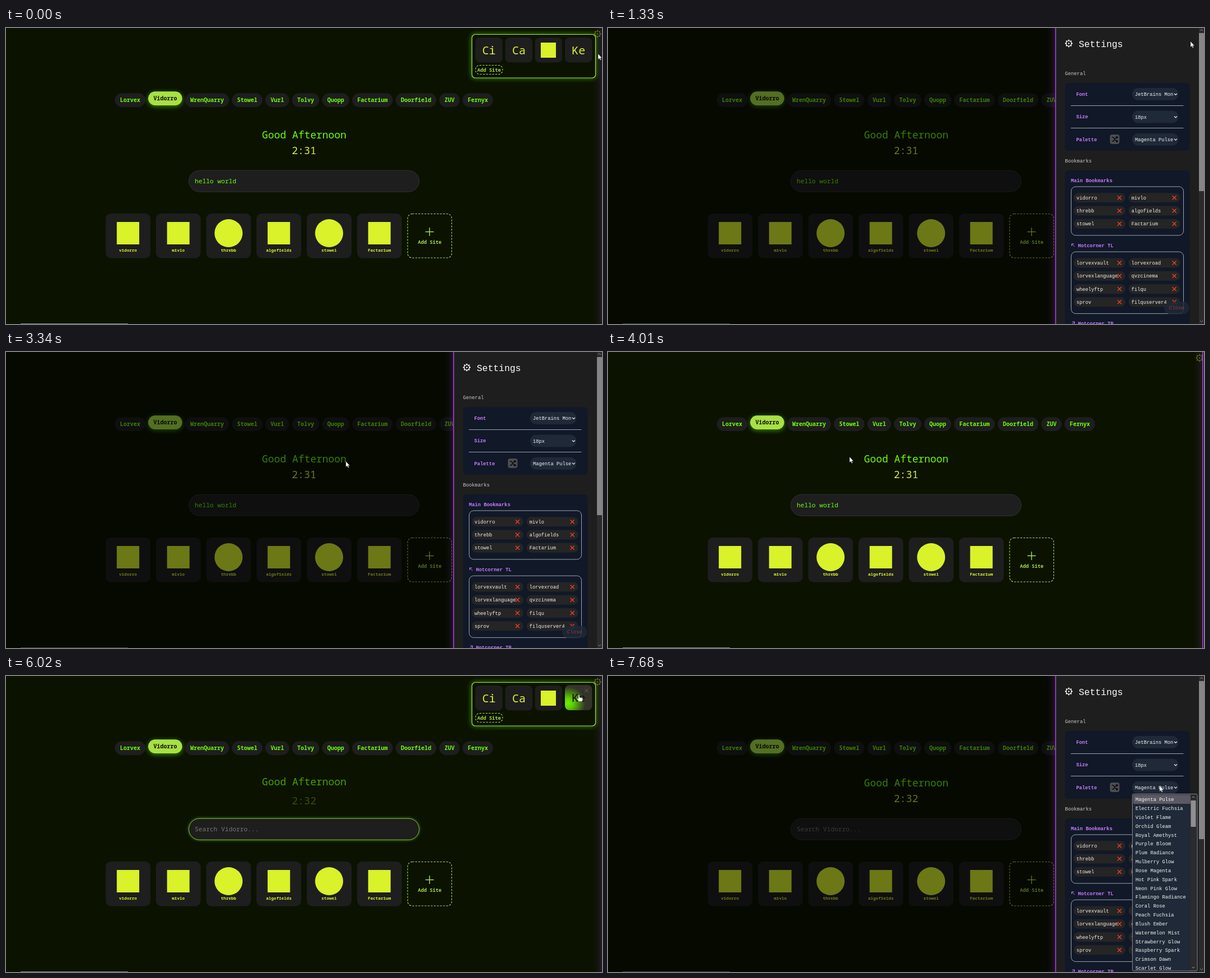
An HTML page that plays this animation: 1061 px wide and 528 px high, repeating every 8 s.

```html
<!DOCTYPE html>
<html lang="en">
<head>
<meta charset="utf-8">
<title>Start page</title>
<style>
  html, body { margin: 0; width: 100%; height: 100%; overflow: hidden; background: #0b1200; }
  svg { display: block; width: 1061px; height: 528px; font: 500 10px "Noto Sans Mono", "DejaVu Sans Mono", monospace; }
  #panel { font-family: "Liberation Mono", "Courier New", monospace; font-weight: 400; }
  .mid { text-anchor: middle; }
  .bold { font-weight: 700; }
  .active { filter: drop-shadow(0 2px 4px rgba(102, 255, 0, .5)); }
  .frame { filter: drop-shadow(0 0 5px rgba(102, 255, 0, .55)); }
  .focus { filter: drop-shadow(0 0 2.5px rgba(102, 255, 0, .5)); }
</style>
</head>
<body>
<svg id="stage" viewBox="0 0 1061 528"></svg>
<script>
const GREEN = '#70ff00', YELLOW = '#d9f22a', LIME = '#a8e045', CARD = '#1e1e1e',
      NAVY = '#111827', SLATE = '#1f2937', PURPLE = '#c77dff';
const DASHED = `stroke="${LIME}" stroke-width="1.1" stroke-dasharray="3.3 2.2"`;
const LOOP = 8000, CLOSED = 265;

const rect = (x, y, w, h, r, fill, more = '') =>
  `<rect x="${x}" y="${y}" width="${w}" height="${h}" rx="${r}" fill="${fill}" ${more}/>`;
const line = (d, color, width = 1, more = '') =>
  `<path d="${d}" fill="none" stroke="${color}" stroke-width="${width}" ${more}/>`;
// y is the middle of the capitals
const text = (x, y, size, fill, str, more = '') =>
  `<text x="${x}" y="${y + size * .36}" font-size="${size}" fill="${fill}" ${more}>${str}</text>`;
const group = (id, body, more = '') => `<g id="${id}" ${more}>${body}</g>`;
const gear = (x, y, color) => {
  let teeth = '';
  for (let i = 0; i < 8; i++) {
    const c = Math.cos(i * Math.PI / 4), s = Math.sin(i * Math.PI / 4);
    teeth += `M${x + 4.8 * c} ${y + 4.8 * s}L${x + 6.7 * c} ${y + 6.7 * s}`;
  }
  return line(teeth, color, 2) +
    `<circle cx="${x}" cy="${y}" r="4.6" fill="none" stroke="${color}" stroke-width="1.4"/>` +
    `<circle cx="${x}" cy="${y}" r="1.2" fill="${color}"/>`;
};

function engines() {
  const names = ['Lorvex', 'Vidorro', 'WrenQuarry', 'Stowel', 'Vurl', 'Tolvy', 'Quopp',
                 'Factarium', 'Doorfield', 'ZUV', 'Fernyx'];
  let x = 193.6, out = '';
  names.forEach((name, i) => {
    const on = i === 1, w = 6 * name.length + 18.6, y = on ? 113.3 : 116.3;
    out += rect(x, y, w, 24.6, 12.3, on ? LIME : CARD, on ? 'class="active"' : '') +
      text(x + 9.3, y + 12.4, 10, on ? '#0b1200' : GREEN, name, 'class="bold"');
    x += w + 4.9;
  });
  return out;
}

function bookmarks() {
  const names = ['vidorro', 'mivlo', 'threbb', 'algofields', 'stowel', 'Factarium'];
  const out = names.map((name, i) => {
    const x = 177.5 + 89.5 * i, c = x + 39.7;
    const icon = i === 2 || i === 4
      ? `<circle cx="${c}" cy="366" r="25" fill="${YELLOW}"/>`
      : rect(c - 20, 346, 40, 40, 0, YELLOW);
    return rect(x, 331, 79.5, 79.5, 9, CARD) + icon +
      text(c, 396, 7.6, YELLOW, name, 'class="mid bold"');
  });
  return out.join('') +
    rect(715, 331.5, 78.5, 78.5, 8, 'none', DASHED) +
    line('M746.5 363.5h15M754 356v15', LIME, 1.4) +
    text(754.3, 382, 8.75, LIME, 'Add Site', 'class="mid bold"');
}

function corner() {
  const tile = x => rect(x, 17, 48.5, 44.5, 8, CARD);
  const label = (x, str) => tile(x) + text(x + 24.3, 40, 20, YELLOW, str, 'class="mid"');
  return rect(829.5, 11.5, 220, 77.5, 6, '#0b1200', `stroke="${LIME}" stroke-width="1.2" class="frame"`) +
    label(835.5, 'Ci') + label(888.7, 'Ca') + tile(941.8) + rect(952, 26, 27, 27, 0, YELLOW) +
    group('rest', label(995, 'Ke')) +
    group('hover', rect(995, 16, 48.5, 45, 8, 'url(#spot)') +
      text(1019.3, 39, 20, '#0b1200', 'Ke', 'class="mid"') +
      line('M1030.5 23l6 6m0-6l-6 6', '#6a6a62')) +
    rect(836, 66.5, 48, 16, 7, 'none', DASHED) +
    text(860, 74.5, 8.75, LIME, 'Add Site', 'class="mid bold"');
}

function select(y, value) {
  return rect(933, y - 11, 82.5, 22, 11, SLATE) +
    `<g clip-path="url(#field)">${text(938, y, 8.75, '#f4f4f4', value)}</g>` +
    line(`M1008 ${y - 1}l2.5 2.5l2.5-2.5`, '#eee', 1.2);
}

function chips(top, names) {
  const height = Math.ceil(names.length / 2) * 23.3 + 17;
  return rect(824.5, top, 200, height, 8, 'none', 'stroke="#9ca3af"') + names.map((name, i) => {
    const x = 829 + (i % 2) * 97.7, y = top + 19.7 + (i >> 1) * 23.25;
    return rect(x, y - 8.5, 92, 17, 8.5, '#252525') + text(x + 5, y, 8.75, '#f0f0f0', name) +
      line(`M${x + 78} ${y - 3.5}l7 7m0-7l-7 7`, '#e8412c', 1.4);
  }).join('');
}

function menu() {
  const names = ['Magenta Pulse', 'Electric Fuchsia', 'Violet Flame', 'Orchid Gleam', 'Royal Amethyst',
    'Purple Bloom', 'Plum Radiance', 'Mulberry Glow', 'Rose Magenta', 'Hot Pink Spark', 'Neon Pink Glow',
    'Flamingo Radiance', 'Coral Rose', 'Peach Fuchsia', 'Blush Ember', 'Watermelon Mist',
    'Strawberry Glow', 'Raspberry Spark', 'Crimson Dawn', 'Scarlet Glow'];
  return rect(933.5, 210.5, 115.5, 315.5, 2, SLATE, 'stroke="#85858a"') +
    rect(935, 212, 102, 16, 0, '#5c5962') +
    names.map((name, i) => text(939, 220 + 15.84 * i, 8.8, '#f4f4f4', name)).join('') +
    rect(1037, 212, 10, 313, 0, '#2b2b2b') + rect(1037.5, 222, 9, 47, 0, '#8f8f8f') +
    line('M1040 217l2-2l2 2M1040 519l2 2l2-2', '#a0a0a0');
}

function panel() {
  const label = (x, y, str) => text(x, y, 8.8, PURPLE, str, 'class="bold"');
  const shuffle = 'M897 195h2.5l5 7h2.5M897 202h2.5l5-7h2.5M905 193l2.5 2l-2.5 2M905 200l2.5 2l-2.5 2';
  return rect(780, 0, 16, 528, 0, 'url(#halo)') + rect(796, 0, 265, 528, 0, CARD) +
    rect(796, 0, 1.6, 528, 0, '#a83fd6') +
    gear(820.3, 27.5, '#fff') + text(838, 28.5, 16.4, '#fff', 'Settings') +
    text(813.5, 80.5, 8.8, '#c8c8c8', 'General') + text(813.5, 236.5, 8.8, '#c8c8c8', 'Bookmarks') +
    rect(813.5, 98, 222, 121, 7, NAVY) + line('M824 138.5h200.5M824 178.5h200.5', '#9ca3af') +
    label(833.5, 118, 'Font') + label(833.5, 158, 'Size') + label(833.5, 198.5, 'Palette') +
    rect(893.5, 190, 17, 17, 4, '#4b4d52') + line(shuffle, '#0c0c0c', 1.4) +
    select(118, 'JetBrains Mono') + select(158.5, '18px') + select(198.7, 'Magenta Pulse') +
    rect(813.5, 254, 222, 290, 7, NAVY) +
    label(824, 271.5, 'Main Bookmarks') +
    chips(283, ['vidorro', 'mivlo', 'threbb', 'algofields', 'stowel', 'Factarium']) +
    line('M830.5 390l-5-5m0 4v-4h4', PURPLE) + label(836.5, 387.5, 'Hotcorner TL') +
    chips(399.2, ['lorvexvault', 'lorvexroad', 'lorvexlanguage', 'qvzcinema', 'wheelyftp', 'filqu',
      'sprov', 'filquserver4']) +
    line('M825.5 529l5-5m-4 0h4v4', PURPLE) + label(836.5, 526.5, 'Hotcorner TR') +
    rect(990, 488, 44.5, 22.5, 11, SLATE, 'opacity=".8"') +
    text(1012.3, 499, 9, '#85403c', 'Close', 'class="mid"') +
    rect(1052, 0, 9, 528, 0, '#2b2b2b') + rect(1052, 9, 9, 282, 0, '#858585') +
    line('M1054 5l2.5-2.5l2.5 2.5M1054 522l2.5 2.5l2.5-2.5', '#8f8f8f') +
    group('menu', menu());
}

stage.innerHTML = `<defs>
  <linearGradient id="halo"><stop stop-color="#8040c0" stop-opacity="0"/>
    <stop offset=".5" stop-color="#8040c0" stop-opacity=".06"/>
    <stop offset="1" stop-color="#8040c0" stop-opacity=".2"/></linearGradient>
  <radialGradient id="spot" cx=".1" cy=".72" r=".65"><stop stop-color="#6cf000"/>
    <stop offset=".3" stop-color="#5fd000"/><stop offset="1" stop-color="#34342a"/></radialGradient>
  <clipPath id="field"><rect x="933" y="100" width="73" height="120"/></clipPath></defs>` +
  rect(0, 0, 1061, 528, 0, '#0b1200') +
  group('page', engines() +
    text(530.9, 191, 17.9, GREEN, 'Good Afternoon', 'class="mid" id="greet"') +
    text(530.5, 218, 18.2, YELLOW, '', 'class="mid" id="clock"') +
    rect(325.5, 254.2, 410, 38, 19, CARD, 'id="search"') +
    text(336, 273.3, 11.2, GREEN, '', 'id="query"') +
    rect(336, 267, 1, 12, 0, GREEN, 'id="caret"') +
    bookmarks() + group('cog', gear(1053, 10.5, YELLOW)) + group('corner', corner())) +
  rect(26, 527, 191, 1, 0, '#87917f') +
  rect(0, 0, 1061, 528, 0, '#000', 'id="dim" opacity=".5"') +
  group('panel', panel()) +
  group('cursor',
    '<path id="arrow" d="M0 0v10l2.3-2l1.7 3.4l1.5-.7l-1.6-3.3h3z" fill="#fff" stroke="#222" stroke-width=".4"/>' +
    '<path id="hand" d="M-1-5q1.2-1 2 0v4l5 1.2q1 .4 .8 1.6l-1 4.7h-6l-3.5-5q.8-1.5 2.7.4z" fill="#fff" stroke="#222" stroke-width=".5"/>');

const $ = id => document.getElementById(id);
const show = (id, on) => $(id).setAttribute('visibility', on ? 'inherit' : 'hidden');
const within = (t, a, b) => t >= a && t < b;
const at = (track, t) => track.findLast(key => key[0] <= t);

const slide = [[0, CLOSED], [990, 40], [1330, 0], [3670, 200], [4010, 262], [4340, CLOSED], [7020, 20], [7360, 0]];
// time, x, y, hand
const pointer = [[0, 1054, 46], [330, 1054, 15], [660, 1053, 13, 1], [990, 1044, 20], [1330, 1037, 24],
  [1660, 976, 168], [2010, 969, 187], [2340, 974, 190], [2680, 969, 214], [3010, 969, 217], [3340, 605, 195],
  [3670, 520, 191], [4010, 430, 187], [4340, 414, 181], [4670, -50, 0], [5340, -50, 0], [5690, -50, 0],
  [6020, 1020, 39, 1], [6350, 1045, 14], [6680, 1052, 13, 1], [7020, 1010, 129], [7360, 985, 182],
  [7680, 982, 196]];

function settle(id, t, start, rate, rise) {
  const left = t < 5340 ? 0 : t < 6020 ? 1 : start * Math.exp((6020 - t) / rate);
  $(id).setAttribute('opacity', 1 - left);
  $(id).setAttribute('transform', `translate(0 ${rise * left})`);
}

function draw(now) {
  const [t, x, y, hand] = at(pointer, now % LOOP);
  const reloaded = t >= 5340, focus = within(t, 6020, 7020);

  show('page', t !== 5340);
  show('corner', t < 330 || within(t, 6020, 6680));
  show('hover', t === 6020);
  show('rest', t !== 6020);
  show('caret', t === 6350);
  show('dim', within(t, 990, 3670) || t >= 7020);
  show('menu', within(t, 2340, 3340) || t >= 7680);
  show('arrow', !hand);
  show('hand', hand);

  settle('greet', t, .4, 300, -7);
  settle('clock', t, .75, 600, 6);
  $('clock').textContent = reloaded ? '2:32' : '2:31';
  $('query').textContent = reloaded ? 'Search Vidorro...' : 'hello world';
  $('query').setAttribute('fill', reloaded ? '#757575' : GREEN);
  $('search').setAttribute('stroke', focus ? '#86b83a' : '#333');
  $('search').setAttribute('class', focus ? 'focus' : '');
  $('cog').setAttribute('opacity', t === 660 || t === 6680 ? .8 : .38);
  $('panel').setAttribute('transform', `translate(${at(slide, t)[1]} 0)`);
  $('cursor').setAttribute('transform', `translate(${x} ${y})`);
}

const begin = performance.now();
function tick() {
  draw(performance.now() - begin);
  requestAnimationFrame(tick);
}
tick();
</script>
</body>
</html>
```
